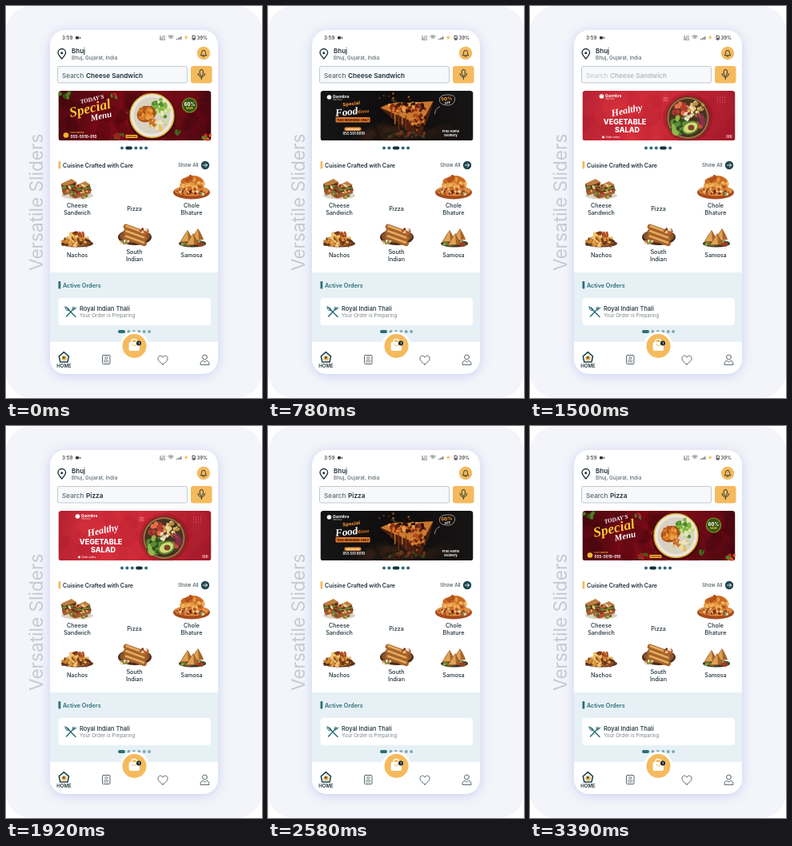
Write an HTML page with a canvas that moves like this. It is 320 px wide and 490 px high and loops after 3.42 s.

```html
<!DOCTYPE html>
<html lang="en">
<head>
<meta charset="utf-8">
<title>Versatile Sliders</title>
<style>
  html, body { margin: 0; width: 100%; height: 100%; overflow: hidden; background: #fff; }
  canvas { display: block; width: 320px; height: 490px; }
</style>
</head>
<body>
<canvas id="stage"></canvas>
<script>
const LOOP = 3420, SLIDE = 450, PITCH = 225.5;
const INK = '#1d3038', TEAL = '#2c6f78', AMBER = '#f5ba5d', GREY = '#7d868c', NIGHT = '#20464f';
const SANS = 'Inter, sans-serif', SCRIPT = '"Liberation Serif", serif';
const canvas = document.getElementById('stage');
const ratio = window.devicePixelRatio || 1;
canvas.width = 320 * ratio;
canvas.height = 490 * ratio;
const c = canvas.getContext('2d');

// ---------- drawing helpers ----------
function text(str, x, y, size, color, { weight = 500, align = 'left', font = SANS, style = '', turn = 0 } = {}) {
  c.save();
  c.translate(x, y);
  c.rotate(turn);
  c.font = `${style} ${weight} ${size}px ${font}`;
  c.textAlign = align;
  c.fillStyle = color;
  c.fillText(str, 0, 0);
  c.restore();
}
function box(x, y, w, h, r, fill, stroke, line = 1) {
  c.beginPath();
  c.roundRect(x, y, w, h, r);
  paint(fill, stroke, line);
}
function paint(fill, stroke, line = 1) {
  if (fill) { c.fillStyle = fill; c.fill(); }
  if (stroke) { c.strokeStyle = stroke; c.lineWidth = line; c.stroke(); }
}
function oval(x, y, rx, ry, fill, turn = 0) {
  c.beginPath();
  c.ellipse(x, y, rx, ry, turn, 0, 7);
  paint(fill);
}
function disc(x, y, r, fill, stroke, line) {
  c.beginPath();
  c.arc(x, y, r, 0, 7);
  paint(fill, stroke, line);
}
function path(d, fill, stroke, line) {
  const p = new Path2D(d);
  if (fill) { c.fillStyle = fill; c.fill(p); }
  if (stroke) { c.strokeStyle = stroke; c.lineWidth = line || 1; c.stroke(p); }
}
function at(x, y, draw, turn = 0) {
  c.save();
  c.translate(x, y);
  c.rotate(turn);
  draw();
  c.restore();
}
function random(seed) {
  return () => (seed = (seed * 16807) % 2147483647) / 2147483647;
}
function pile(x, y, rx, ry, colors, count, size, seed, stretch = 1) {
  const rnd = random(seed * 7919);
  for (let i = 0; i < count; i++) {
    const a = rnd() * 6.28, d = Math.sqrt(rnd());
    const s = size * (0.6 + rnd() * 0.7);
    oval(x + Math.cos(a) * d * rx, y + Math.sin(a) * d * ry, s * stretch, s, colors[i % colors.length], rnd() * 3);
  }
}
function gradient(x0, y0, x1, y1, ...colors) {
  const g = c.createLinearGradient(x0, y0, x1, y1);
  colors.forEach((color, i) => g.addColorStop(i / (colors.length - 1), color));
  return g;
}

// ---------- timing ----------
function ease(p) {
  if (p <= 0) return 0;
  if (p >= 1) return 1;
  let lo = 0, hi = 1, u = 0.5;
  for (let i = 0; i < 20; i++) {
    u = (lo + hi) / 2;
    const v = 1 - u;
    if (1.2 * v * v * u + 0.6 * v * u * u + u * u * u < p) lo = u; else hi = u;
  }
  return 3 * (1 - u) * u * u + u * u * u;
}
const swipes = [[55, 1], [828, 1], [1990, -1], [2661, -1]];
const pageAt = t => swipes.reduce((sum, [start, step]) => sum + step * ease((t - start) / SLIDE), 0);
const clamp = v => Math.max(0, Math.min(1, v));

// ---------- banners, 191 x 62 ----------
function specialBanner() {
  box(0, 0, 191, 62, 0, gradient(0, 0, 191, 30, '#4a0810', '#6d0a14', '#7d0d18', '#430710'));
  pile(95, 30, 95, 32, ['rgba(30,0,4,.16)', 'rgba(190,20,35,.09)'], 40, 9, 5, 1.8);
  pile(7, 4, 7, 4, ['#4f7a23', '#2f5418'], 6, 2, 3, 1.8);
  pile(77, 57, 8, 3, ['#3b651d', '#a51c1f'], 7, 1.7, 8, 2);
  pile(185, 57, 6, 4, ['#c6281f', '#e04b2a', '#587f25'], 8, 2.3, 4, 1.3);
  pile(70, 7, 4, 3, ['#4f7a23', '#b3242a'], 4, 1.3, 9, 2);
  const script = { font: SCRIPT, style: 'italic', weight: 700, turn: -0.22 };
  text("TODAY'S", 28, 16, 7.4, '#fff', script);
  text('Special', 15, 33, 17.5, '#ffc934', script);
  text('Menu', 41, 38, 11, '#fff', script);
  disc(9.5, 55.5, 3.3, '#f2b52e');
  text('FOR ORDERS', 15, 53, 2.7, '#f2b52e', { weight: 600 });
  text('055-5010-010', 15, 59, 4.7, '#fff', { weight: 700 });
  text('Lunch & Dinner', 87, 29, 4, '#e7b13b', { font: SCRIPT, style: 'italic', turn: -0.9 });
  box(84, 55, 15, 4, 1, '#f2c32e');
  text('ORDER NOW', 91.5, 58, 2.1, '#5c0a12', { weight: 700, align: 'center' });
  disc(117, 32, 30, 'rgba(25,0,3,.5)');
  disc(117, 31, 27.5, '#ece6da', '#d6a62b', 1.6);
  disc(117, 31, 23, '#d8d2c2');
  pile(128, 22, 11, 11, ['#82b83b', '#c3d987', '#518c27', '#e4e6c0'], 44, 2.4, 12, 1.4);
  pile(123, 43, 12, 6, ['#e8c15b', '#b8d26d', '#d64e2d', '#f0e3bd'], 20, 2, 2, 1.3);
  oval(110, 29, 12, 10, '#a94e16', -0.4);
  pile(109, 28, 9, 8, ['#d97d25', '#b4561a', '#eba044'], 34, 2.1, 6, 1.3);
  at(114, 37, () => { box(0, -2, 12, 4, 2, '#c87528'); disc(12, 0, 2, '#f1d8a7'); }, 0.8);
  at(164, 18, () => {
    disc(0, 0, 9, '#36520f', '#78a428', 1.2);
    text('60%', 0, 0.5, 5.6, '#fff', { weight: 800, align: 'center' });
    text('SAVE', 0, 5, 3.4, '#e8d54a', { weight: 700, align: 'center' });
  });
  pile(149, 53, 4, 3, ['#476c20', '#223f16'], 5, 1.5, 14, 2);
}
function foodBanner() {
  box(0, 0, 191, 62, 0, gradient(0, 0, 191, 0, '#151516', '#0e0c0c', '#171414'));
  pile(108, 56, 60, 8, ['rgba(90,50,30,.1)'], 24, 8, 21, 2);
  disc(11, 8, 2.8, '#fff');
  text('Quembra', 15.5, 8.5, 4.5, '#fff', { weight: 700 });
  text('fresh food', 15.5, 12, 2.3, '#ccc');
  text('Special', 28, 19.5, 6, '#ef8c2e', { weight: 800, turn: -0.12 });
  text('Food', 19, 32, 13, '#fff', { font: SCRIPT, style: 'italic', weight: 700, turn: -0.1 });
  text('Menu', 45, 28.5, 6.5, '#ef7d27', { font: SCRIPT, style: 'italic', weight: 700, turn: -0.1 });
  box(19, 33, 43, 6.5, 1, '#e97725');
  text('THIS WEEKEND ONLY', 40.5, 37.8, 3.8, '#191413', { weight: 800, align: 'center' });
  box(30, 45.5, 21, 4.5, 2, '#ef8c2e');
  text('ORDER NOW', 40.5, 48.8, 2.7, '#fff', { weight: 700, align: 'center' });
  text('055 501 0010', 28, 55, 4.2, '#fff', { weight: 700 });

  // slice with dripping cheese
  oval(110, 55, 32, 5, '#241812');
  path('M75 22 Q92 13 108 16 L141 14 L136 32 L124 57 L112 54 L92 36 Z', '#4a1f11');
  path('M75 21 Q92 12 108 15 L141 13 L125 43 Z', '#c9772f');
  pile(109, 21, 24, 5, ['#8e2d17', '#e3a044', '#5a2112', '#d3681f', '#2d140c'], 64, 1.9, 31, 1.7);
  for (let i = 0; i < 10; i++) {
    box(88 + i * 4.6, 25 + 6 * Math.sin(i / 3), 1.2, 9 + (i * 7) % 5 * 3, 0.6, i % 2 ? '#d88430' : '#7b3417');
  }
  pile(122, 37, 10, 9, ['#6e2a14', '#d5822f', '#2b130b', '#b14b1d'], 26, 1.7, 33, 1.5);
  pile(110, 55, 30, 3, ['#7a2f1c', '#3b2013', '#33451f'], 22, 1.5, 25, 1.6);
  pile(97, 8, 24, 5, ['#6c2d16', '#9a5a21', '#3d4c22'], 10, 0.9, 18, 1.5);

  path('M149 13 q-2 -7 8 -8 q13 -1 11 7 q-2 7 -11 6 q-5 0 -8 -4', null, '#c9c4bf', 0.7);
  text('50%', 158, 12, 6, '#f19a3c', { weight: 800, align: 'center', turn: -0.12 });
  text('OFF', 159, 16.5, 4, '#fff', { weight: 700, align: 'center', turn: -0.12 });
  path('M149 20 q-6 2 -6 9', null, '#ddd', 0.6);
  text('Free Home', 163, 52, 4.1, '#fff', { weight: 700, align: 'center' });
  text('Delivery', 163, 57, 4.1, '#fff', { weight: 700, align: 'center' });
}
function saladBanner() {
  box(0, 0, 191, 62, 0, gradient(0, 0, 191, 40, '#b52131', '#d22b3a', '#c92836', '#a0182a'));
  pile(95, 32, 95, 35, ['rgba(120,5,20,.07)', 'rgba(255,90,80,.05)'], 28, 10, 27, 1.7);
  disc(24, 7, 2.8, '#fff');
  text('Quembra', 28.5, 7.5, 4.5, '#fff', { weight: 700 });
  text('fresh food', 28.5, 11, 2.3, '#f7d6d6');
  text('Healthy', 37, 32, 12, '#fff', { font: SCRIPT, style: 'italic', weight: 700, turn: -0.2 });
  const heavy = { weight: 800, align: 'center' };
  text('VEGETABLE', 53, 42, 9, '#fff', heavy);
  text('SALAD', 56, 51.5, 9, '#fff', heavy);
  disc(26, 58, 1.4, '#fff');
  text('Order online', 29, 59, 3, '#fff');
  disc(132, 34, 31, 'rgba(110,5,20,.22)');
  disc(132, 34, 27.5, '#6c2f20');
  disc(132, 34, 26, '#a36f43');
  disc(132, 34, 24, '#443421');
  pile(123, 24, 10, 9, ['#b73c2f', '#e27148', '#7c3327'], 30, 2.6, 37);
  pile(142, 22, 10, 9, ['#e2bd69', '#f0dba4', '#b98d44'], 36, 2, 39);
  pile(120, 43, 10, 10, ['#5c8b31', '#90b84c', '#304f23'], 30, 3, 41, 1.4);
  pile(147, 38, 6, 10, ['#8b2e4a', '#d24935', '#693346'], 24, 2.3, 43);
  oval(135, 46, 11, 8, '#668c32', -0.4);
  oval(135, 46, 9, 6, '#d4dc7a', -0.4);
  oval(136, 46, 4, 3.5, '#7b4b29');
  pile(131, 31, 5, 5, ['#f2e7c8', '#d5c393'], 12, 1.7, 44);
  for (let i = 0; i < 3; i++) box(101, 8 + i * 2, 6, 0.8, 0, '#ef8890');
  for (let i = 0; i < 12; i++) disc(169 + i % 4 * 3, 8 + Math.floor(i / 4) * 3, 0.5, '#ed8188');
  for (let i = 0; i < 5; i++) box(180 + i * 1.5, 55, 0.8, 4, 0, '#f0b3b3');
}
const banners = [specialBanner, foodBanner, saladBanner];

function drawSlider(page) {
  c.save();
  c.beginPath();
  c.rect(55, 100, 210, 75);
  c.clip();
  banners.forEach((draw, i) => {
    const offset = (i - page) * PITCH;
    if (Math.abs(offset) > 205) return;
    at(65.5 + offset, 106, () => {
      c.beginPath();
      c.roundRect(0, 0, 191, 62.5, 4);
      c.clip();
      draw();
    });
  });
  c.restore();
  const active = Math.round(page) + 1;
  let x = 143;
  for (let i = 0; i < 5; i++) {
    const w = i === active ? 8.5 : 4;
    box(x, 175.5, w, 4, 2, i === active ? '#15333d' : '#356878');
    x += w + 2.4;
  }
}

// ---------- dishes ----------
function dishes() {
  // sandwich
  oval(89, 237, 20, 4.5, '#dcd2c6');
  pile(89, 236, 17, 3, ['#6f5a2c', '#a1b153', '#b3472b'], 20, 1.7, 51, 1.6);
  for (const [x, y] of [[69, 233], [86, 236]]) {
    at(x, y, () => {
      path('M0 -10 L18 -14 L21 -5 L2 1 Z', '#5a2c1c');
      path('M1 -3 L20 -7 L20 -4 L2 2 Z', '#b8442a');
      path('M0 -7 L20 -10 L20 -8 L1 -4 Z', '#718f37');
      path('M0 -11 L13 -17 L20 -12 L3 -8 Z', '#bd7f41');
      path('M2 0 L20 -5 L20 -2 L3 4 Z', '#9c632f');
    });
  }
  pile(88, 228, 16, 6, ['#8f2c20', '#d9ad52', '#57752f', '#5d2a1e', '#e8d3a0'], 30, 1.2, 53, 1.6);
  // chole bhature
  oval(232, 233, 23, 8.5, '#a64a1c');
  oval(232, 231, 21, 6.5, '#e0913f');
  oval(233, 223, 15, 11, '#d3772a', -0.1);
  pile(232, 222, 13, 9, ['#e59a44', '#f0b55f', '#c96822', '#b3521c'], 34, 2.2, 56, 1.5);
  pile(230, 232, 17, 4, ['#b95525', '#dc7d34', '#6e2a16', '#e9c27a'], 40, 1.5, 57, 1.3);
  pile(243, 233, 7, 3, ['#e2d7bb', '#c4482e', '#769c3c'], 10, 1.4, 58, 1.5);
  // nachos
  oval(89, 297, 20, 4.5, '#5d3820');
  pile(89, 294, 18, 5, ['#ce7d2e', '#e9ae4d', '#8a461f', '#f0c675', '#5f341c'], 70, 1.6, 61, 2.3);
  pile(89, 288, 9, 5, ['#b65026', '#efc36b', '#d8943c', '#7d361c'], 44, 1.4, 62, 2.2);
  // south indian
  oval(161, 289, 21, 10, '#4c2a18');
  oval(161, 288, 19, 8, '#85552f');
  at(161, 286, () => {
    for (let i = 0; i < 3; i++) {
      box(-17 + i * 2, -9 + i * 6, 31, 6.5, 3, '#a9632a');
      box(-15 + i * 2, -8 + i * 6, 26, 2.6, 1.3, '#e3ae60');
    }
  }, 0.35);
  pile(173, 281, 5, 3, ['#c45a28', '#e9dfc9', '#7c3018'], 14, 1.4, 63);
  pile(148, 295, 6, 2.5, ['#eee4ce', '#7f9c46', '#c98038'], 14, 1.4, 64);
  // samosa
  oval(233, 297, 17, 4.5, '#383128');
  pile(233, 297, 14, 3, ['#5c7f2f', '#8aa54b', '#3e4a26'], 18, 1.7, 66, 1.4);
  for (const [x, y] of [[225, 288], [238, 286], [232, 292]]) {
    path(`M${x - 8} ${y + 8} Q${x - 3} ${y - 1} ${x + 2} ${y - 8} Q${x + 7} ${y} ${x + 9} ${y + 6} Z`, '#a9642a');
    path(`M${x - 6} ${y + 6} L${x + 2} ${y - 7} L${x + 3} ${y + 6} Z`, '#dca356');
  }
  oval(243, 298, 4, 2.4, '#a5391f');

  const label = (str, x, y) => text(str, x, y, 7.2, INK, { align: 'center' });
  label('Cheese', 89, 251.5);
  label('Sandwich', 89, 260.5);
  label('Pizza', 160.5, 256);
  label('Chole', 232, 251.5);
  label('Bhature', 232, 260.5);
  label('Nachos', 89, 314);
  label('South', 160.5, 309.5);
  label('Indian', 160.5, 318.5);
  label('Samosa', 232, 314);
}

// ---------- chrome ----------
const phone = () => c.roundRect(55, 30, 210, 430, 19);

function backdrop() {
  box(0, 0, 320, 490, 0, '#fff');
  box(0, 0, 320, 490, 32, '#f4f5fa');
  text('Versatile Sliders', 46, 331, 22.6, '#c5cbd2', { weight: 400, turn: -Math.PI / 2 });
  c.save();
  c.shadowColor = 'rgba(125,140,225,.36)';
  c.shadowBlur = 14 * ratio;
  c.shadowOffsetY = 2 * ratio;
  c.beginPath();
  phone();
  paint('#fff');
  c.restore();
}
function header() {
  text('3:59', 70, 42, 6.2, '#333');
  box(87, 38, 4, 3.4, 1, '#333');
  path('M91.3 39.7 l1.8 -1.3 v2.8 z', '#333');
  text('0.37', 192, 39.5, 3.4, '#444');
  text('KB/S', 192, 42.7, 3, '#444');
  for (let i = 1; i < 4; i++) {
    c.beginPath();
    c.arc(206, 41.5, i * 1.6, -2.3, -0.8);
    paint(null, '#444', 0.7);
  }
  for (let i = 0; i < 4; i++) box(213 + i * 1.8, 41 - i, 1, 1 + i, 0, '#555');
  path('M226 36 l-3 4 h2 l-1 3 l3.4 -4.4 h-2.2 z', '#f0b62f');
  box(233, 37.2, 3.4, 5, 0.6, '#fff', '#333', 0.8);
  box(233.6, 39.8, 2.2, 2, 0, '#444');
  text('39%', 238.5, 42, 6, '#333');

  path('M69.8 66 C66.5 62.3 65 60.5 65 58.3 a4.8 4.8 0 0 1 9.6 0 C74.6 60.5 73 62.3 69.8 66 Z', null, INK, 1.3);
  disc(69.8, 58.7, 1.5, INK);
  text('Bhuj', 82, 59, 8, INK, { weight: 600 });
  text('Bhuj, Gujarat, India', 82, 67.2, 6.35, '#5f6b72');
  disc(247, 59, 8.2, AMBER);
  path('M243.4 61.5 q1.2 -1 1.2 -3.2 q0 -3 2.4 -3 q2.4 0 2.4 3 q0 2.2 1.2 3.2 z M246 63 h2', null, INK, 0.9);
}
function searchBar(t) {
  box(64.5, 75.5, 162, 20.5, 2, '#f6f8fa', '#b9c3c9', 0.9);
  box(231, 75, 26.5, 21.5, 3, AMBER);
  box(242.2, 79.5, 4.2, 7.5, 2.1, null, INK, 1);
  path('M240 84.5 a4.3 4.3 0 0 0 8.6 0 M244.3 88.8 v2.7', null, INK, 1);
  const swap = 1565;
  c.globalAlpha = t < swap ? clamp((swap - t) / 215) : clamp((t - swap) / 215);
  text('Search', 70, 89.5, 8.2, '#596970');
  text(t < swap ? 'Cheese Sandwich' : 'Pizza', 100, 89.5, 8.2, INK, { weight: 600 });
  c.globalAlpha = 1;
}
function sections() {
  box(65.5, 194, 2.8, 9.5, 1, AMBER);
  text('Cuisine Crafted with Care', 71, 201.6, 7.15, INK, { weight: 600 });
  text('Show All', 215, 201.4, 6.2, '#4d5a60');
  disc(249, 199, 5.2, NIGHT);
  path('M246.5 199 h5 M249.4 196.8 l2.2 2.2 l-2.2 2.2', null, '#fff', 0.9);
  dishes();

  box(55, 333, 210, 87, 0, '#e7f1f5');
  box(65.5, 344, 2.8, 9.5, 1, TEAL);
  text('Active Orders', 71, 351.6, 7.2, TEAL, { weight: 600 });
  box(65.5, 365, 190.5, 34, 4, '#fff');
  c.lineCap = 'round';
  path('M76 377.5 L87 388.5 M86 377 L75.5 388', null, TEAL, 1.5);
  path('M74 376 q0 5 4 4.5 l1 -1 q0 -2 -5 -3.5 M84 376 l-1 3 q1 2 3 0 l2 -2', null, TEAL, 1);
  text('Royal Indian Thali', 92, 381.2, 7.5, INK);
  text('Your Order is Preparing', 92, 389.3, 6.25, GREY, { weight: 400 });
  box(140, 405, 9, 4, 2, TEAL);
  for (let i = 0; i < 5; i++) disc(153.5 + i * 6.4, 407, 2, '#7fa9b3');
}
function navigation() {
  c.save();
  c.beginPath();
  phone();
  c.clip();
  box(55, 420, 210, 40, 0, '#fff');
  c.restore();
  disc(160.5, 425, 18, '#fff');
  disc(160.5, 425, 15, AMBER);
  box(153.6, 420, 13.4, 11, 2, '#fff');
  path('M156.8 421 v-1.3 a3.4 3.4 0 0 1 6.8 0 V421', null, '#fff', 1.3);
  path('M158 422.5 a2.4 2.4 0 0 0 4.8 0', null, AMBER, 0.9);
  disc(166, 421.5, 3, '#17262c');
  text('1', 166, 423, 4, '#fff', { weight: 700, align: 'center' });

  c.lineJoin = 'round';
  path('M66.3 437.8 L72.3 432.6 L78.5 437.8 L77 445 H67.8 Z', null, NIGHT, 1.6);
  disc(72.6, 440.2, 3.3, AMBER);
  disc(72.3, 439.6, 1.4, NIGHT);
  text('HOME', 72.5, 452, 6, INK, { weight: 600, align: 'center' });
  box(120.5, 436.5, 9.5, 11, 1, null, '#56656d', 1);
  path('M122.5 445 h5.5 M122.5 443 h5.5', null, '#56656d', 0.8);
  disc(125.3, 439.9, 1.5, null, '#56656d', 0.8);
  path('M196 448 C191 444.4 190 442.5 190 440.4 C190 436.8 194.6 436 196 439.2 C197.4 436 202 436.8 202 440.4 C202 442.5 201 444.4 196 448 Z', null, '#56656d', 1);
  disc(248.5, 439, 2.9, null, '#56656d', 1);
  path('M243 448 q0 -4.5 3.5 -4.5 l2 1.6 l2 -1.6 q3.5 0 3.5 4.5 z', null, '#56656d', 1);
}

const start = performance.now();
function frame() {
  const t = (performance.now() - start) % LOOP;
  c.setTransform(ratio, 0, 0, ratio, 0, 0);
  backdrop();
  header();
  searchBar(t);
  drawSlider(pageAt(t));
  sections();
  navigation();
  requestAnimationFrame(frame);
}
frame();
</script>
</body>
</html>
```
